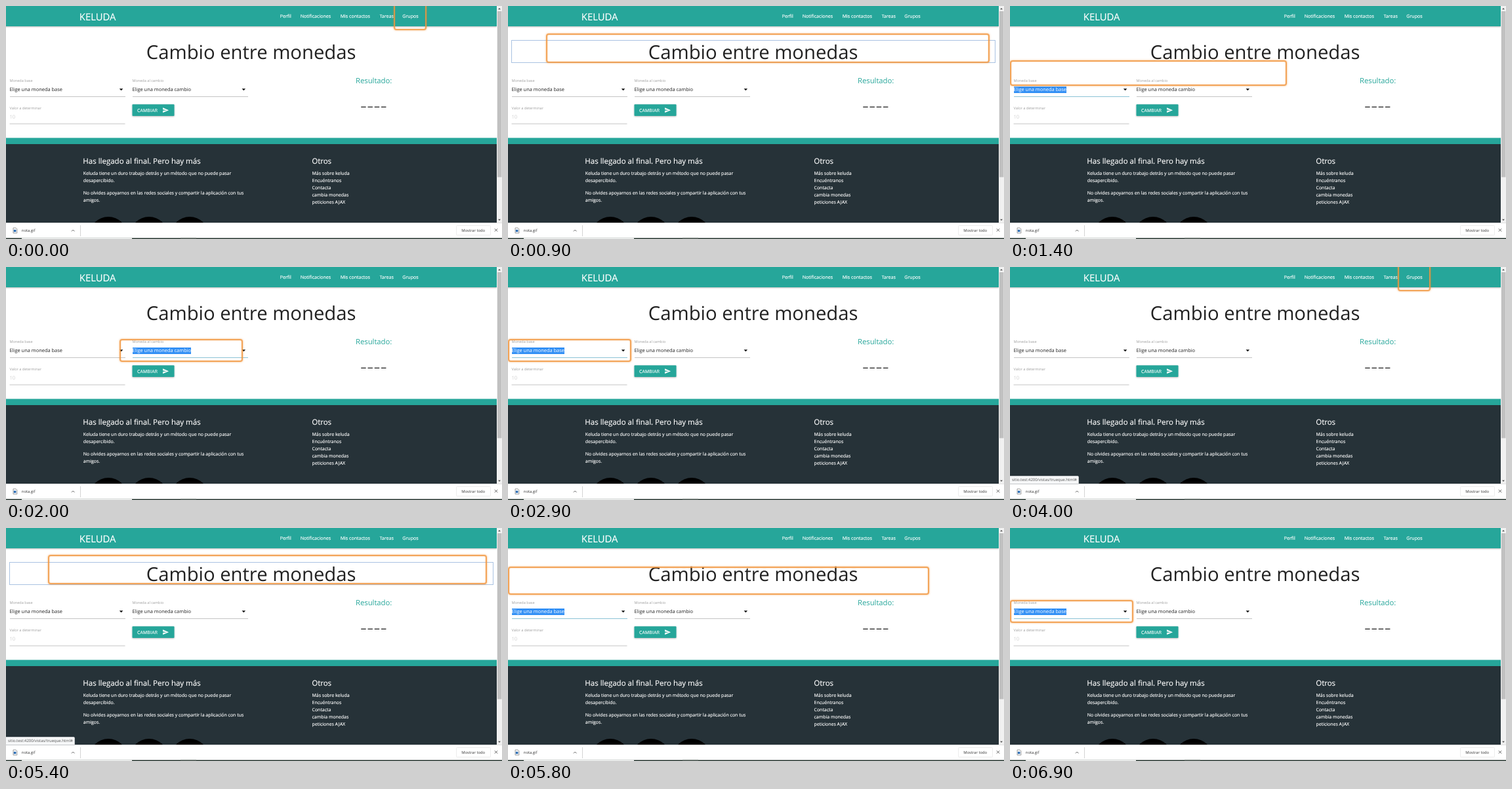
An HTML page that plays this animation: 756 by 356 pixels, repeating every 7700 ms.

```html
<!DOCTYPE html>
<html lang="es">
<head>
<meta charset="utf-8">
<title>Cambio entre monedas</title>
<style>
  :root {
    /* ring poses: top right bottom left */
    --grupos: -8px 115px 319px 591px;
    --tareas: -8px 154px 319px 556px;
    --title: 47px 12px 264px 0px;
    --base: 110px 568.5px 211.5px 0px;
    --cambio: 110px 381.5px 211.5px 187px;
  }
  html, body { margin: 0; width: 100%; height: 100%; overflow: hidden; background: #fff; }
  body {
    position: relative;
    font-family: "Open Sans", "Noto Sans", sans-serif;
    text-rendering: geometricPrecision;
  }
  svg { position: absolute; left: 0; top: 0; display: block; }
  .nav text, .button text, .footer text { fill: #fff; stroke: #fff; stroke-width: .15px; }
  .nav text { font-size: 7.07px; }
  .nav .brand { font-size: 14.85px; }
  .label { font-size: 5.55px; fill: #9e9e9e; }
  .footer text { font-size: 6.97px; }
  .footer .head { font-size: 11.5px; }
  .shelf text { font-size: 5.85px; fill: #333; }

  .field, .outline, .bubble, .ring { position: absolute; box-sizing: border-box; }
  .field {
    top: 122.5px; width: 176px; height: 16px;
    border-bottom: 1px solid #c4c4c4;
    font-size: 7.45px; line-height: 10.5px; color: #222; white-space: nowrap;
  }
  .field span { display: inline-block; }
  .left { left: 5.5px; }
  .right { left: 192.5px; }
  .on { border-color: #8cc3d6; color: #fff; }
  .on span { background: #3390f5; }
  .outline { left: 5px; top: 51.5px; width: 738px; height: 35px; border: 1px solid #a9c2e2; }
  .bubble {
    left: -1px; top: 319px; width: 106px; height: 12.5px; padding-left: 3px;
    border: 1px solid #c4c7ca; border-radius: 0 2px 0 0; background: #f6f7f8;
    font-size: 5.95px; line-height: 10.5px; color: #555; white-space: nowrap;
  }
  .ring {
    border: 2px solid rgba(241, 150, 62, .85); border-radius: 4px;
    box-shadow: 0 0 3px rgba(242, 140, 40, .6), inset 0 0 2px rgba(242, 140, 40, .5);
    animation: fly 7.7s ease infinite paused;
  }
  .left.on, .right.on, .outline, .bubble { opacity: 0; animation: 7.7s step-end infinite paused; }
  .left.on { animation-name: focus-base; }
  .right.on { animation-name: focus-cambio; }
  .outline { animation-name: focus-title; }
  .bubble { animation-name: status; }

  @keyframes fly {
    0%, 8.44% { inset: var(--grupos); }
    13.64%, 16.44% { inset: var(--title); }
    21.64%, 22.49% { inset: var(--base); }
    27.69%, 31.82% { inset: var(--cambio); }
    37.01%, 39.22% { inset: var(--base); }
    44.15%, 45.97% { inset: var(--title); }
    51.17%, 52.99% { inset: var(--grupos); }
    58.18%, 60.26% { inset: var(--tareas); }
    65.45%, 66.96% { inset: var(--grupos); }
    72.16%, 74.55% { inset: var(--title); }
    79.74%, 100% { inset: var(--base); }
  }
  @keyframes focus-title {
    0%, 16.44%, 45.97%, 74.55%, 100% { opacity: 0; }
    8.44%, 39.22%, 66.96% { opacity: 1; }
  }
  @keyframes focus-base {
    0%, 22.49%, 39.22% { opacity: 0; }
    16.44%, 31.82%, 74.55%, 100% { opacity: 1; }
  }
  @keyframes focus-cambio {
    0%, 31.82%, 100% { opacity: 0; }
    22.49% { opacity: 1; }
  }
  @keyframes status {
    0%, 72.7%, 100% { opacity: 0; }
    50.6% { opacity: 1; }
  }
</style>
</head>
<body>
<svg width="756" height="356" viewBox="0 0 756 356">
  <defs>
    <filter id="shade" x="-10%" y="-20%" width="120%" height="160%">
      <feDropShadow dx="0" dy=".8" stdDeviation=".8" flood-opacity=".3"/>
    </filter>
    <clipPath id="page"><rect width="748" height="331"/></clipPath>
  </defs>

  <g class="nav">
    <rect x="-5" y="-5" width="753" height="36" fill="#26a69a" filter="url(#shade)"/>
    <text class="brand" x="111.8" y="21.5">KELUDA</text>
    <text x="417.7" y="18">Perfil</text>
    <text x="448.7" y="18">Notificaciones</text>
    <text x="509.7" y="18">Mis contactos</text>
    <text x="569.5" y="18">Tareas</text>
    <text x="604.3" y="18">Grupos</text>
  </g>

  <text x="373.6" y="81" text-anchor="middle" font-size="29.22" fill="#212121">Cambio entre monedas</text>

  <text class="label" x="5.5" y="116">Moneda base</text>
  <text class="label" x="192.5" y="116">Moneda al cambio</text>
  <text class="label" x="5.5" y="157.5">Valor a determinar</text>
  <text x="5.5" y="172.3" font-size="7.6" fill="#d0d0d0">10</text>
  <path d="M5.5 180h176" stroke="#c4c4c4"/>
  <path d="M172.8 126.3h5.6l-2.8 3zM359.5 126.3h5.6l-2.8 3z" fill="#111"/>

  <g class="button">
    <rect x="192.5" y="150.3" width="64" height="17.7" rx="1" fill="#26a69a" filter="url(#shade)"/>
    <text x="200" y="162" font-size="6.75" letter-spacing=".25">CAMBIAR</text>
    <path transform="translate(238.2 154) scale(.43)" d="M2 21l21-9L2 3v7l15 2-15 2z" fill="#fff"/>
  </g>

  <text x="533" y="118" font-size="11.25" fill="#26a69a">Resultado:</text>
  <text x="539.7" y="162.6" font-size="32" font-weight="300" fill="#212121">----</text>

  <g class="footer" clip-path="url(#page)">
    <rect y="201.5" width="748" height="10" fill="#26a69a"/>
    <rect y="211" width="748" height="120" fill="#263238"/>
    <text class="head" x="117.3" y="241">Has llegado al final. Pero hay más</text>
    <text x="117.8" y="258">Keluda tiene un duro trabajo detrás y un método que no puede pasar</text>
    <text x="117.8" y="269">desapercibido.</text>
    <text x="117.8" y="287.5">No olvides apoyarnos en las redes sociales y compartir la aplicación con tus</text>
    <text x="117.8" y="298.5">amigos.</text>
    <text class="head" x="466.2" y="241">Otros</text>
    <text x="466.5" y="258">Más sobre keluda</text>
    <text x="466.5" y="269">Encuéntranos</text>
    <text x="466.5" y="280">Contacta</text>
    <text x="466.5" y="291">cambia monedas</text>
    <text x="466.5" y="302">peticiones AJAX</text>
    <circle cx="156" cy="351" r="29"/>
    <circle cx="218" cy="351" r="29"/>
    <circle cx="280" cy="351" r="29"/>
  </g>

  <g class="scrollbar">
    <rect x="748" width="8" height="331" fill="#f1f1f1"/>
    <rect x="749" y="8" width="6.5" height="253.5" fill="#c1c1c1"/>
    <path d="M750 5.3l2-2.4 2 2.4zM750 325.7l2 2.4 2-2.4z" fill="#505050"/>
  </g>

  <g class="shelf">
    <rect y="331" width="756" height="25" fill="#fff"/>
    <path d="M0 331.5h756" stroke="#e4e4e4"/>
    <path d="M11 339h4l1.8 1.8v6.2H11z" fill="#fff" stroke="#777" stroke-width=".7"/>
    <rect x="11.8" y="341.8" width="3.6" height="3.4" fill="#2f6fb5"/>
    <text x="23.8" y="345">nota.gif</text>
    <path d="M100 344.3l2.2-2.2 2.2 2.2M744.8 340.2l4.4 4.4m0-4.4l-4.4 4.4" fill="none" stroke="#555" stroke-width=".9"/>
    <path d="M113.5 335v17" stroke="#d5d5d5"/>
    <rect x="686.5" y="335.5" width="52" height="14.5" rx="1" fill="#fff" stroke="#ececec"/>
    <text x="694.3" y="344.7">Mostrar todo</text>
    <rect y="354.5" width="756" height="1.5" fill="#26352f"/>
    <rect x="24" y="354.5" width="168" height="1.5" fill="#fff"/>
    <rect x="266" y="354.5" width="24" height="1.5" fill="#59635f"/>
  </g>
</svg>

<div class="field left"><span>Elige una moneda base</span></div>
<div class="field right"><span>Elige una moneda cambio</span></div>
<div class="field left on"><span>Elige una moneda base</span></div>
<div class="field right on"><span>Elige una moneda cambio</span></div>
<div class="outline"></div>
<div class="bubble">sitio.test:4200/vistas/trueque.html#</div>
<div class="ring"></div>

<script>
  // The keyframes hold the motion; time advances in 100 ms steps.
  const LOOP = 7700, STEP = 100;
  const parts = document.getAnimations();
  const start = performance.now();

  function tick() {
    const t = (performance.now() - start) % LOOP;
    const snapped = Math.floor(t / STEP) * STEP;
    for (const part of parts) part.currentTime = snapped;
    requestAnimationFrame(tick);
  }
  tick();
</script>
</body>
</html>
```
